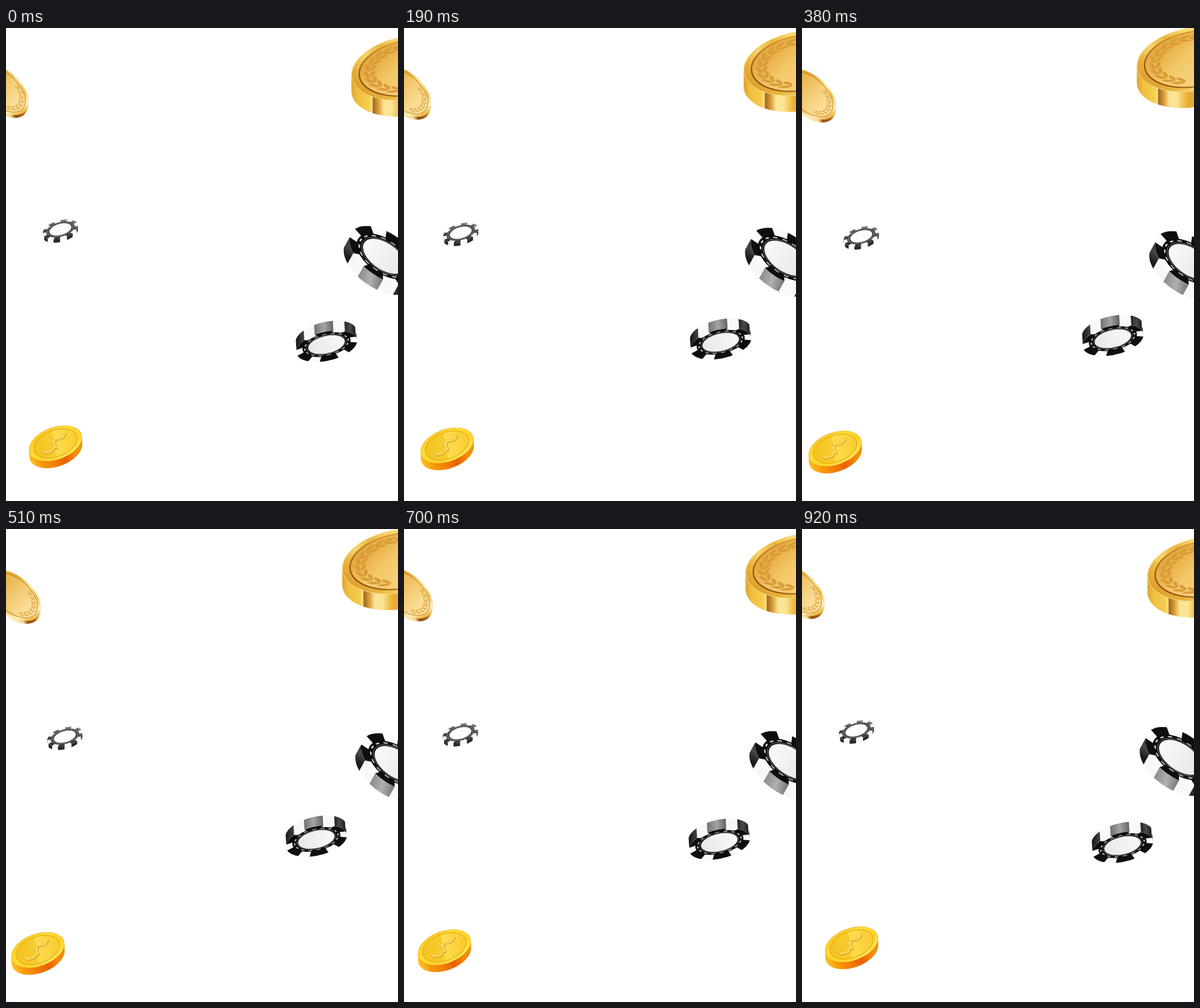
These frames come from a looping animation (681 by 822 pixels, 0.95 s). An HTML page:

```html
<!DOCTYPE html>
<html lang="en">
<head>
<meta charset="utf-8">
<title>Coins and chips</title>
<style>
  html, body { margin: 0; width: 100%; height: 100%; overflow: hidden; background: #fff; }
  svg { display: block; width: 681px; height: 822px; }
</style>
</head>
<body>
<svg id="stage" viewBox="0 0 681 822"></svg>
<script>
const RAD = Math.PI / 180;

// A disc is a tilted ellipse (x, y, a, b, rot) with its thickness along (dx, dy).
function pt(d, deg, k = 1, lift = 0) {
  const u = d.a * k * Math.cos(deg * RAD), v = d.b * k * Math.sin(deg * RAD);
  const c = Math.cos(d.rot * RAD), s = Math.sin(d.rot * RAD);
  return [d.x + u * c - v * s + d.dx * lift, d.y + u * s + v * c + d.dy * lift];
}

function arc(d, from, to, k, lift) {
  const n = Math.ceil(Math.abs(to - from) / 4);
  return Array.from({ length: n + 1 }, (_, i) => pt(d, from + (to - from) * i / n, k, lift));
}

const fix = p => p.map(v => v.toFixed(1)).join(' ');
const poly = (pts, fill, extra = '') => `<path d="M${pts.map(fix).join('L')}Z" fill="${fill}" ${extra}/>`;
const line = (color, width) => `stroke="${color}" stroke-width="${width}"`;

const oval = (d, k, fill, extra, lift = 0) => poly(arc(d, 0, 360, k, lift), fill, extra);

const band = (d, from, to, k0, k1, l0, l1, fill) =>
  poly([...arc(d, from, to, k0, l0), ...arc(d, to, from, k1, l1)], fill);

// Outline of the face swept along its thickness.
function body(d, fill) {
  const c = Math.cos(d.rot * RAD), s = Math.sin(d.rot * RAD);
  const u = d.dx * c + d.dy * s, v = d.dy * c - d.dx * s;
  const t = Math.atan2(-u / d.a, v / d.b) / RAD;
  return poly([...arc(d, t, t + 180, 1, 1), ...arc(d, t + 180, t + 360, 1, 0)], fill);
}

function grad(id, [x1, y1, x2, y2], ...stops) {
  const list = stops.map(([at, color]) => `<stop offset="${at}" stop-color="${color}"/>`).join('');
  return `<linearGradient id="${id}" gradientUnits="userSpaceOnUse" x1="${x1}" y1="${y1}" x2="${x2}" y2="${y2}">${list}</linearGradient>`;
}

function leaf(d, deg, k0, k1, turn, fill) {
  const base = pt(d, deg, k0), tip = pt(d, deg + turn, k1);
  const m = (k0 + k1) / 2;
  const c1 = pt(d, deg + turn * .1, m + (k1 - k0) * .5), c2 = pt(d, deg + turn * .95, m - (k1 - k0) * .4);
  return `<path d="M${fix(base)}Q${fix(c1)} ${fix(tip)}Q${fix(c2)} ${fix(base)}Z" fill="${fill}"/>`;
}

function laurel(d, from, count, step, k, spread, turn, fill) {
  let out = '';
  for (let i = 0; i < count; i++)
    for (const side of [spread, -spread]) out += leaf(d, from + i * step, k, k + side, turn, fill);
  return out;
}

function chip(d, { first, sides, tops, half, ring, hole, sink, ink, center, marks, mark, rule }) {
  const spots = sides.map((fill, i) => [first + i * 360 / sides.length, fill]);
  let out = body(d, '#f8f8f9');
  for (const [at, fill] of spots) out += band(d, at - half, at + half, 1, 1, 0, 1, fill);
  out += oval(d, 1, '#fafafb');
  for (const [at] of spots) out += band(d, at - half, at + half, 1, ring - .04, 0, sink, tops);
  out += oval(d, ring, ink, '', sink);
  const mid = (ring + hole) / 2 + .02, gap = 360 / marks;
  for (let i = 0; i < marks; i++)
    out += band(d, (i - mark) * gap, (i + mark) * gap, mid + .02, mid - .02, sink, sink, '#d6d6d8');
  return out + oval(d, hole + .04, 'none', line('#8a8a8c', rule), sink) + oval(d, hole, center, '', sink);
}

function goldLeft() {
  const d = { x: -7, y: 107.5, a: 55, b: 32, rot: 42, dx: -1, dy: 5 };
  return grad('la', [-20, 150, 42, 130], [0, '#fff3cf'], [.4, '#f8dc93'], [.52, '#8e4d16'], [.72, '#a8621c'], [.85, '#f3bd45'], [1, '#d8951f'])
    + grad('lb', [0, 72, 34, 145], [0, '#e2a62c'], [.35, '#ffe79c'], [.6, '#f2c04a'], [.85, '#fff2be'], [1, '#eab13d'])
    + grad('lc', [-20, 80, 32, 130], [0, '#eab651'], [.5, '#f5cf7a'], [1, '#fce5a8'])
    + body(d, 'url(#la)') + oval(d, 1, 'url(#lb)')
    + oval(d, .88, 'url(#lc)', line('#c88c2c', 1.2))
    + laurel(d, 48, 8, -15, .74, .09, -15, '#e6b252');
}

function goldRight() {
  const d = { x: 700, y: 69, a: 101, b: 55, rot: -10, dx: 0, dy: 28 };
  return grad('ra', [600, 0, 690, 0], [0, '#dda431'], [.12, '#f0bf41'], [.34, '#f6cc4c'], [.4, '#fae08a'], [.42, '#a0691f'], [.52, '#d79c34'], [.63, '#fbe594'], [.78, '#fbe494'], [.92, '#f0bc42'], [1, '#e6ab34'])
    + grad('rb', [605, 110, 685, 25], [0, '#d9982a'], [.25, '#e9b03a'], [.5, '#f8d36a'], [.75, '#ecb540'], [1, '#f9d972'])
    + grad('rc', [620, 40, 690, 110], [0, '#dd9f38'], [.35, '#e9b24a'], [.65, '#f3c869'], [1, '#f6d07a'])
    + grad('rd', [615, 100, 675, 30], [0, '#8a4e12'], [.45, '#b67821'], [1, '#d99b32'])
    + body(d, 'url(#ra)') + oval(d, .995, 'url(#rb)', line('#f8dd86', 1))
    + oval(d, .865, 'url(#rc)', line('url(#rd)', 2.6))
    + laurel(d, 108, 11, 16, .69, .1, 18, '#d99c38');
}

function goldSmall() {
  const d = { x: 86, y: 722, a: 48, b: 28, rot: -20, dx: .5, dy: 12 };
  const sign = 'M65 735q4 4 12 2q8-3 8-12q-2-11 6-11q8 1 11-7M69 739l-5-5M97 710l6-4M80 717l8 13';
  return grad('sa', [40, 750, 133, 715], [0, '#ffc62a'], [.18, '#f59a0c'], [.4, '#f37d05'], [.6, '#e96102'], [.78, '#f58a0b'], [1, '#e79a10'])
    + grad('sb', [60, 695, 105, 750], [0, '#f6c51c'], [.35, '#ffdc38'], [.7, '#ffd22a'], [1, '#ffe95a'])
    + grad('sc', [50, 728, 122, 716], [0, '#f3c422'], [.46, '#f7cc2e'], [.48, '#ffdc50'], [1, '#f9cd30'])
    + body(d, 'url(#sa)') + oval(d, .99, 'url(#sb)')
    + oval(d, .82, 'url(#sc)', line('#dfa916', 1.2))
    + `<g fill="none" stroke-linecap="round" stroke-linejoin="round"><path d="${sign}" ${line('#d39a1a', 4.6)}/>`
    + `<path d="${sign}" ${line('#f8d95c', 3.2)} transform="translate(-.5 -.6)"/></g>`;
}

function chipSmall() {
  const d = { x: 94.5, y: 350, a: 31.5, b: 15.5, rot: -16, dx: 0, dy: 6 };
  return grad('ca', [0, 335, 0, 372], [0, '#7a7a7c'], [.45, '#4a4a4c'], [1, '#222224'])
    + chip(d, {
      first: 20, sides: Array(8).fill('#29292b'), tops: 'url(#ca)', half: 11,
      ring: .81, hole: .62, sink: 0, ink: '#404042', center: '#fdfdfd', marks: 36, mark: .22, rule: .4
    });
}

function chipRight() {
  const d = { x: 658, y: 395, a: 70, b: 38, rot: 35, dx: -10, dy: 18 };
  return grad('da', [612, 430, 655, 440], [0, '#8a8a8c'], [.5, '#b0b0b2'], [1, '#747476'])
    + grad('db', [588, 395, 606, 365], [0, '#1a1a1c'], [.5, '#48484a'], [1, '#161618'])
    + grad('dc', [630, 370, 690, 425], [0, '#f8f8fa'], [1, '#e6e7ea'])
    + chip(d, {
      first: 89, sides: ['url(#da)', 'url(#db)', '#222', '#222', '#222', '#2c2c2e'], tops: '#0e0e10', half: 17,
      ring: .78, hole: .6, sink: .1, ink: '#0c0c0e', center: 'url(#dc)', marks: 16, mark: .24, rule: 1
    });
}

function chipMid() {
  const d = { x: 557, y: 553, a: 54, b: 25, rot: -13, dx: -1, dy: -17 };
  return grad('ea', [534, 520, 570, 516], [0, '#6e6e70'], [.5, '#a4a4a6'], [1, '#5c5c5e'])
    + grad('eb', [505, 0, 608, 0], [0, '#1a1a1c'], [.14, '#4a4a4c'], [.2, '#222'], [.8, '#222'], [.9, '#4a4a4c'], [1, '#161618'])
    + grad('ec', [530, 560, 588, 538], [0, '#e8e9ec'], [1, '#f8f8fa'])
    + chip(d, {
      first: 271, sides: ['url(#ea)', 'url(#eb)', '#222', '#222', '#222', 'url(#eb)'], tops: '#0e0e10', half: 18,
      ring: .79, hole: .6, sink: .16, ink: '#0c0c0e', center: 'url(#ec)', marks: 16, mark: .24, rule: .8
    });
}

// Drift vector and the step at which each piece turns back.
const pieces = [
  { draw: goldLeft, to: [21.5, 8.5], peak: 12 },
  { draw: goldRight, to: [-18.5, -15], peak: 9.5 },
  { draw: chipSmall, to: [8.5, 12], peak: 10.3 },
  { draw: chipRight, to: [20.5, 11], peak: 14 },
  { draw: chipMid, to: [-18, -11], peak: 12 },
  { draw: goldSmall, to: [-31, 9.8], peak: 12.2 }
];
const LOOP = 950, BEAT = 190, LAST = 24;

const stage = document.getElementById('stage');
stage.innerHTML = pieces.map(p => `<g>${p.draw()}</g>`).join('');
const groups = [...stage.children];

// Five steps per beat; the third is held for 70 ms, the others for 30 ms.
function stepAt(t) {
  const r = t % BEAT;
  return 5 * Math.floor(t / BEAT) + Math.min(Math.floor(r / 30), 2) + Math.max(0, Math.floor((r - 100) / 30));
}

function render(t) {
  const n = stepAt(t);
  pieces.forEach(({ to, peak }, i) => {
    const q = n < peak ? n / peak : (LAST - n) / (LAST - peak);
    const e = (1 - Math.cos(Math.PI * q)) / 2;
    groups[i].setAttribute('transform', `translate(${to[0] * e} ${to[1] * e})`);
  });
}

const start = performance.now();
function tick() {
  render((performance.now() - start) % LOOP);
  requestAnimationFrame(tick);
}
tick();
</script>
</body>
</html>
```
